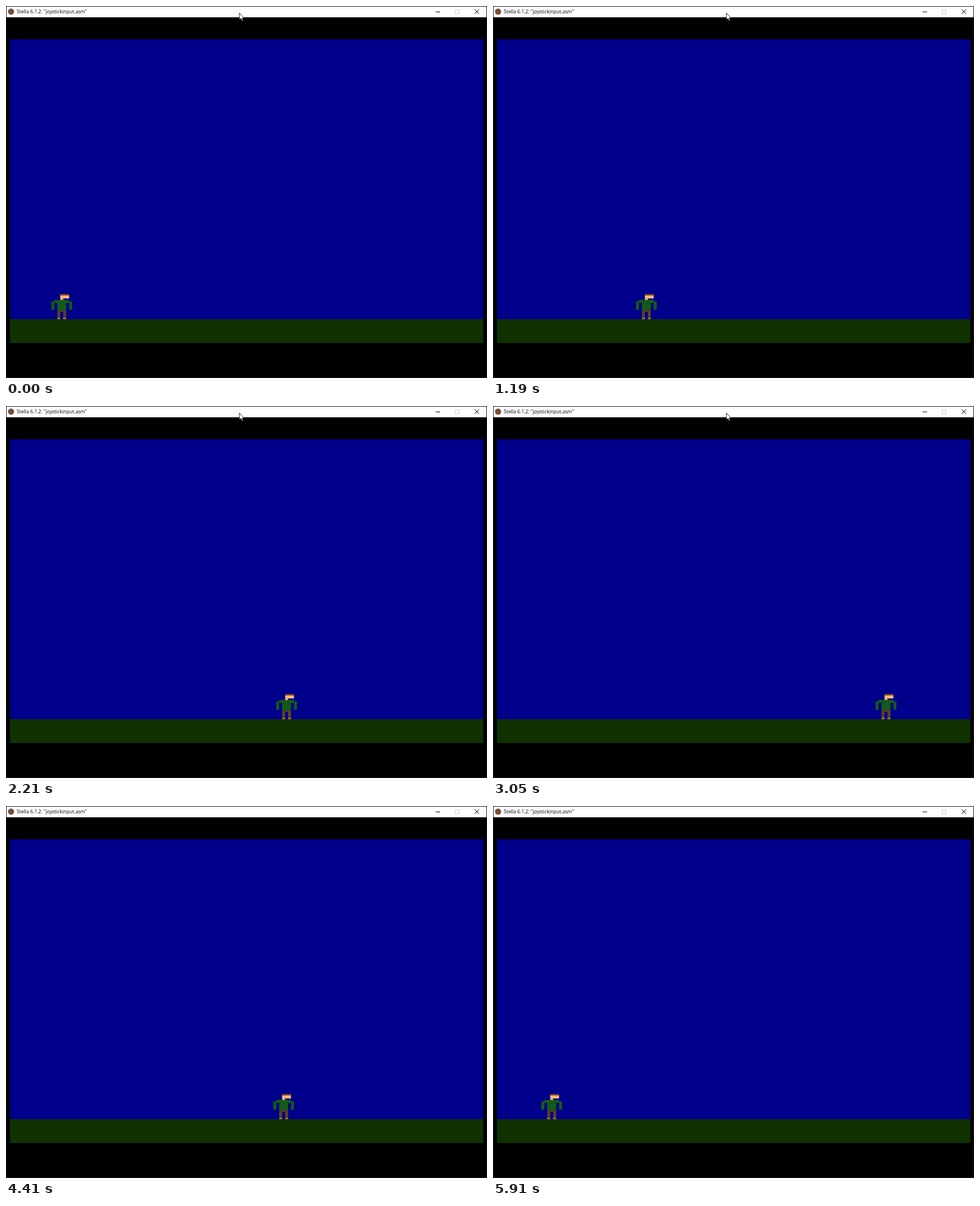
An HTML page with a canvas that plays this animation: 851x658 px, repeating every 5.93 s.

```html
<!DOCTYPE html>
<html lang="en">
<head>
<meta charset="utf-8">
<title>Joystick input</title>
<style>
  html, body { margin: 0; width: 100%; height: 100%; overflow: hidden; background: #000; }
  canvas { display: block; }
</style>
</head>
<body>
<canvas id="stage" width="851" height="658"></canvas>
<script>
const W = 851, H = 658, LOOP = 5930, CURSOR_GONE = 4085;
const LEFT = 7, WIDTH = 837.5, GROUND = 554;
const COL = WIDTH / 160, ROW = 2.62, ROWS = 17;

const screen = document.getElementById('stage').getContext('2d');
const game = new OffscreenCanvas(W, H).getContext('2d');

// Joystick pushes: when each begins and the column it leads to
const FIRST_COLUMN = 14, MS_PER_COLUMN = 15.8;
const PUSHES = [
  [314, 48], [1172, 40], [1415, 130], [3016, 102], [3940, 85], [4345, 94], [4655, 15]
];

function columnAt(t) {
  let column = FIRST_COLUMN;
  for (const [start, goal] of PUSHES) {
    if (t < start) break;
    const moved = Math.floor((t - start) / MS_PER_COLUMN);
    const way = goal - column;
    column += Math.sign(way) * Math.min(Math.abs(way), moved);
  }
  return column;
}

function rect(ctx, color, x, y, w, h) {
  ctx.fillStyle = color;
  ctx.fillRect(x, y, w, h);
}

function drawWalker(column) {
  const x = LEFT + column * COL, y = GROUND - ROWS * ROW;
  const block = (color, c, r, w, h) =>
    rect(game, color, x + c * COL, y + r * ROW, w * COL, h * ROW);
  const hair = '#7d4c20', skin = '#fabb72', shirt = '#145c14';
  const pants = '#5f3f20', feet = '#a07a48';

  block(hair, 3, 0, 3, 1);
  block(skin, 3, 1, 3, 2);
  block(skin, 3, 3, 1, 1);
  block(shirt, 1, 4, 5, 2);
  block(shirt, 2, 6, 3, 5);
  for (const arm of [0, 6]) block(shirt, arm, 5, 1, 5.6);
  block(pants, 2, 11, 3, 1);
  for (const leg of [2, 4]) {
    block(pants, leg, 12, 1, 4);
    block(feet, leg, 16, 1, 1);
  }
}

function drawGame(t) {
  game.clearRect(0, 0, W, H);
  rect(game, '#00008b', LEFT, 59, WIDTH, GROUND - 59);
  rect(game, '#0f3200', LEFT, GROUND, WIDTH, 42);
  drawWalker(columnAt(t));
  // The emulated picture is slightly soft from scaling
  screen.filter = 'blur(0.5px)';
  screen.drawImage(game.canvas, 0, 0);
  screen.filter = 'none';
}

function drawTitleBar() {
  rect(screen, '#fff', 1, 1, W - 2, 19);
  screen.fillStyle = '#755039';
  screen.beginPath();
  screen.arc(9, 10, 5.5, 0, 2 * Math.PI);
  screen.fill();
  screen.fillStyle = '#000';
  screen.font = '8.6px "Open Sans", "Noto Sans", sans-serif';
  screen.fillText('Stella 6.1.2: "joystickinput.asm"', 19, 13);

  rect(screen, '#000', 760, 10, 8, 1);
  screen.lineWidth = 1;
  screen.strokeStyle = '#ccc';
  screen.strokeRect(794.5, 6.5, 7, 7);
  screen.strokeStyle = '#000';
  screen.stroke(new Path2D('M829 6l8 8m0-8l-8 8'));
}

const arrow = new Path2D('M413 12.5v12l2.7-2.5 2 4.5 1.9-.9-2-4.3h3.7z');

function drawCursor() {
  screen.fillStyle = '#fff';
  screen.fill(arrow);
  screen.lineWidth = 0.9;
  screen.strokeStyle = '#000';
  screen.stroke(arrow);
}

function draw(t) {
  rect(screen, '#16162a', 0, 0, W, H);
  rect(screen, '#000', 1, 1, W - 2, H - 2);
  drawTitleBar();
  drawGame(t);
  if (t < CURSOR_GONE) drawCursor();
}

const start = performance.now();
function tick() {
  draw((performance.now() - start) % LOOP);
  requestAnimationFrame(tick);
}
tick();
</script>
</body>
</html>
```
